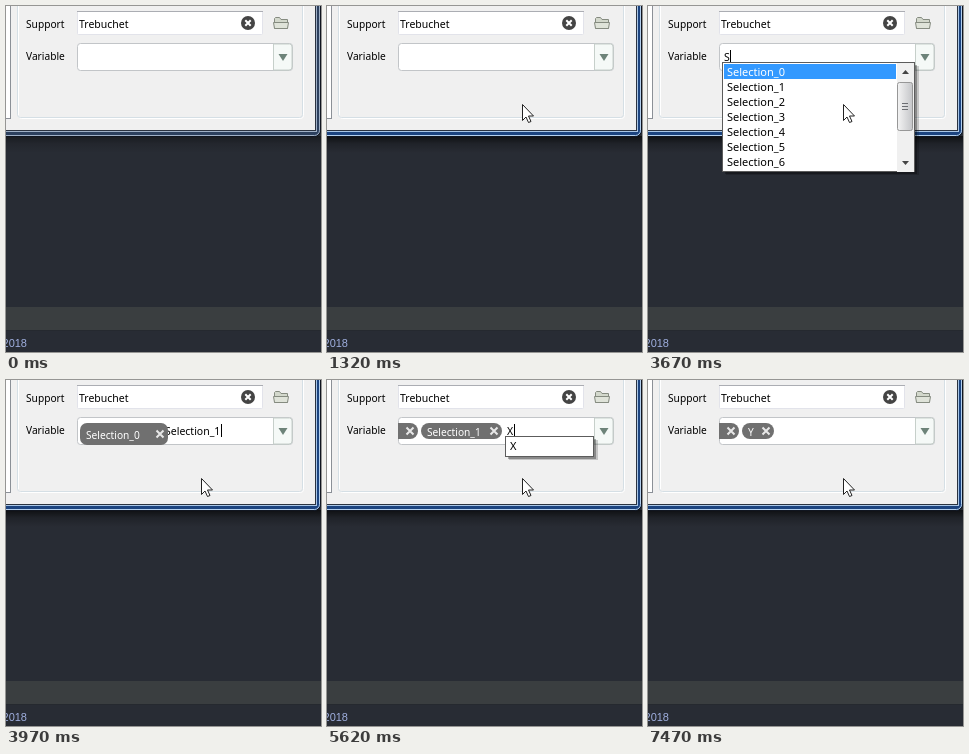
These frames come from a looping animation (315x346 px, 8000 ms). An HTML page:

```html
<!DOCTYPE html>
<html lang="en">
<head>
<meta charset="utf-8">
<title>Variable picker</title>
<style>
html, body { margin: 0; width: 100%; height: 100%; overflow: hidden; background: #282c34; }
svg { display: block; width: 315px; height: 346px; }
text { font: 10.5px "Noto Sans", "Open Sans", sans-serif; fill: #000; white-space: pre; }
.label { font-size: 10.2px; }
.status { font: 11px "Liberation Sans", sans-serif; fill: #a0b0e0; }
</style>
</head>
<body>
<svg viewBox="0 0 315 346" xmlns="http://www.w3.org/2000/svg">
  <defs>
    <linearGradient id="shade" x2="0" y2="1">
      <stop stop-color="#000" stop-opacity=".65"/>
      <stop offset=".45" stop-color="#000" stop-opacity=".22"/>
      <stop offset="1" stop-color="#000" stop-opacity="0"/>
    </linearGradient>
    <linearGradient id="thumb"><stop stop-color="#f4f4f4"/><stop offset="1" stop-color="#c4c5c8"/></linearGradient>
    <clipPath id="field"><rect x="71" y="38" width="196" height="27"/></clipPath>
  </defs>

  <rect width="315" height="346" fill="#282c34"/>
  <rect y="301" width="315" height="23" fill="#3a3e40"/>
  <rect y="324" width="315" height="1" fill="#25292f"/>
  <text class="status" x="21" y="341" text-anchor="end">2018</text>

  <rect id="shadow" y="130" width="315" height="17" fill="url(#shade)"/>
  <rect id="frame" x="-20.500" y="-20.500" width="335" height="151" rx="6" stroke="#10151f"/>
  <g fill="none">
    <rect id="rim" x="-20.500" y="-20.500" width="334" height="150" rx="5"/>
    <rect id="inset" x="-20.500" y="-20.500" width="331" height="146"/>
  </g>
  <rect x="-20.500" y="-20.500" width="330" height="145" fill="#f0f0f0" stroke="#2b3340"/>
  <rect x="-5" y="-5" width="9.500" height="117.500" fill="#fff" stroke="#8b9097"/>
  <rect x="12.500" y="-10" width="285" height="122.500" rx="3" fill="none" stroke="#fff"/>
  <rect x="11.500" y="-10" width="285" height="121.500" rx="3" fill="none" stroke="#d5dfe5"/>

  <text class="label" x="20" y="22">Support</text>
  <text class="label" x="20" y="54">Variable</text>
  <rect x="71.500" y="5.500" width="185" height="23" rx="1" fill="#fff" stroke="#e2e3ea"/>
  <path d="M71 5.500H257" stroke="#abadb3"/>
  <text x="73" y="22">Trebuchet</text>
  <circle cx="242" cy="17" r="7" fill="#444"/>
  <path d="M239.300 14.300l5.400 5.400m0-5.400l-5.400 5.400" stroke="#fff" stroke-width="2"/>
  <g stroke="#858b80">
    <path d="M268.500 22.500v-10l1-1h4l1.500 2h6.500v9z" fill="#d3d8cc"/>
    <path d="M267.500 16.500h15l-1 6h-13z" fill="#dfe3d9"/>
  </g>

  <rect x="71.500" y="37.500" width="215" height="27" rx="3" fill="#fff" stroke="#c2c5c8"/>
  <path d="M267.500 38H283.500Q286 38 286 41V61Q286 64 283 64H267.500Z" fill="#f5f9f7" stroke="#c6cfca"/>
  <path d="M272.500 48h9l-4.500 7z" fill="#6d8379"/>

  <g id="live"></g>
</svg>
<script>
const LOOP = 8000;
const $ = id => document.getElementById(id);
const REST = { cursor: [195, 98] };
const NAMES = Array.from({ length: 7 }, (_, i) => "Selection_" + i);

const tag = (label, x, width, raised = false) => ({ label, x, width, raised });
const scrolled = label => tag(label, 9, 82);
const first = raised => tag(NAMES[0], 74, raised ? 88 : 81, raised);
const second = raised => tag(NAMES[1], 94, raised ? 88 : 81, raised);
const short = (label, raised) => tag(label, 94, raised ? 40 : 32, raised);

// Each entry changes only the listed properties from its time onwards.
const steps = [
  [0, { active: false, cursor: null, beam: false, tags: [], text: "", textX: 76, caret: 0, popup: null }],
  [380, { cursor: [235, 204] }],
  [460, { cursor: [190, 150] }],
  [550, { cursor: [135, 83] }],
  [630, { cursor: [108, 52], beam: true }],
  [850, { active: true, caret: 76 }],
  [1000, { cursor: [160, 80], beam: false }],
  [1100, REST],
  [1320, { caret: 0 }],
  [1870, { caret: 76 }],
  [2420, { caret: 0 }],
  [2720, { text: "S", caret: 82, popup: { x: 74, items: NAMES } }],
  [3220, { caret: 0 }],
  [3670, { caret: 82, popup: { x: 74, items: NAMES, picked: true } }],
  [3750, { text: NAMES[0], caret: 132 }],
  [3970, { popup: null, tags: [first(true)], text: NAMES[1], textX: 159, caret: 215 }],
  [4070, { tags: [first()] }],
  [4520, { caret: 0 }],
  [5070, { tags: [scrolled(NAMES[0]), second(true)], text: "", textX: 180, caret: 180 }],
  [5170, { tags: [scrolled(NAMES[0]), second()] }],
  [5620, { text: "X", caret: 187, popup: { x: 178, items: ["X"] } }],
  [5850, { popup: { x: 178, items: ["X"], picked: true } }],
  [5930, { popup: null, tags: [scrolled(NAMES[1]), short("X", true)], text: "", textX: 131, caret: 131 }],
  [6010, { tags: [scrolled(NAMES[1]), short("X")] }],
  [6390, { caret: 0 }],
  [6690, { text: "Y", caret: 138, popup: { x: 129, items: ["Y"] } }],
  [6920, { popup: null, tags: [scrolled("X"), short("Y", true)], text: "", caret: 131 }],
  [7020, { tags: [scrolled("X"), short("Y")] }],
  [7470, { caret: 0 }]
];

const rect = (x, y, w, h, fill, more = "") =>
  `<rect x="${x}" y="${y}" width="${w}" height="${h}" fill="${fill}" ${more}/>`;
const write = (x, y, label, color = "#000", size = 10.5) =>
  `<text x="${x}" y="${y}" style="fill:${color};font-size:${size}px">${label}</text>`;

function drawTag({ label, x, width, raised }) {
  const height = raised ? 22 : 16, cx = x + width - 8, cy = raised ? 54 : 51;
  return rect(x, 43, width, height, "#707070", `rx="${raised ? 7 : 8}"`) +
    write(x + 6, cy + 4.5, label, "#fff", 10.2) +
    `<path d="M${cx - 3.5} ${cy - 3.5}l7 7m0-7l-7 7" stroke="#e8e8e8" stroke-width="2"/>`;
}

function drawScrollbar() {
  const grip = [97, 100, 103].map(y => rect(254, y, 6, 1, "#6b6d72")).join("");
  return rect(249, 57, 17, 109, "#f0f0f0") +
    rect(249.5, 76.5, 15, 48, "url(#thumb)", 'rx="2" stroke="#979797"') + grip +
    '<path d="M254 68l3.500-4 3.500 4zM254 155l3.500 4 3.500-4z" fill="#444"/>';
}

function drawPopup({ x, items, picked }) {
  const long = items.length > 1, right = 267, height = long ? 110 : 21;
  const rows = items.map((label, i) => {
    const hot = picked && i === 0;
    return (hot ? rect(x + 2, 58 + i * 15, (long ? 248 : 265) - x - 2, 15, "#3399ff") : "") +
      write(x + 5, 70 + i * 15, label, hot ? "#fff" : "#000", 11);
  }).join("");
  return rect(x + 4, 60, right - x, height - 1, "#000", 'opacity=".18"') +
    rect(x + 3, 59, right - x - 1, height - 1, "#000", 'opacity=".3"') +
    rect(x + .5, 56.5, right - x - 1, height - 1, "#fff", 'stroke="#5c5c5c"') +
    rows + (long ? drawScrollbar() : "");
}

function drawCursor([x, y], beam) {
  return beam
    ? `<path transform="translate(${x} ${y})" d="M-3-7.500h2.500l.5.5.5-.5H3M0-7V8M-3 8.500h2.500L0 8l.5.5H3" fill="none" stroke="#111"/>`
    : `<path transform="translate(${x + .5} ${y})" d="M0 .5V16.500L3.500 13 6 18.500 8.500 17.500 6 12H11Z" fill="#fff" stroke="#222"/>`;
}

function render(time) {
  const s = Object.assign({}, ...steps.filter(([at]) => at <= time).map(step => step[1]));
  $("shadow").setAttribute("opacity", s.active ? 1 : .6);
  $("frame").setAttribute("fill", s.active ? "#1c4480" : "#2c405e");
  $("rim").setAttribute("stroke", s.active ? "#b4d0ee" : "#9fb0c6");
  $("inset").setAttribute("stroke", s.active ? "#a9c6e6" : "#9fb0c6");
  $("live").innerHTML =
    '<g clip-path="url(#field)">' + write(s.textX, 54.5, s.text) +
    (s.caret ? rect(s.caret, 44, 1, 13, "#000") : "") +
    s.tags.map(drawTag).join("") + "</g>" +
    (s.popup ? drawPopup(s.popup) : "") +
    (s.cursor ? drawCursor(s.cursor, s.beam) : "");
}

const start = performance.now();
function tick() {
  render((performance.now() - start) % LOOP);
  requestAnimationFrame(tick);
}
tick();
</script>
</body>
</html>
```
